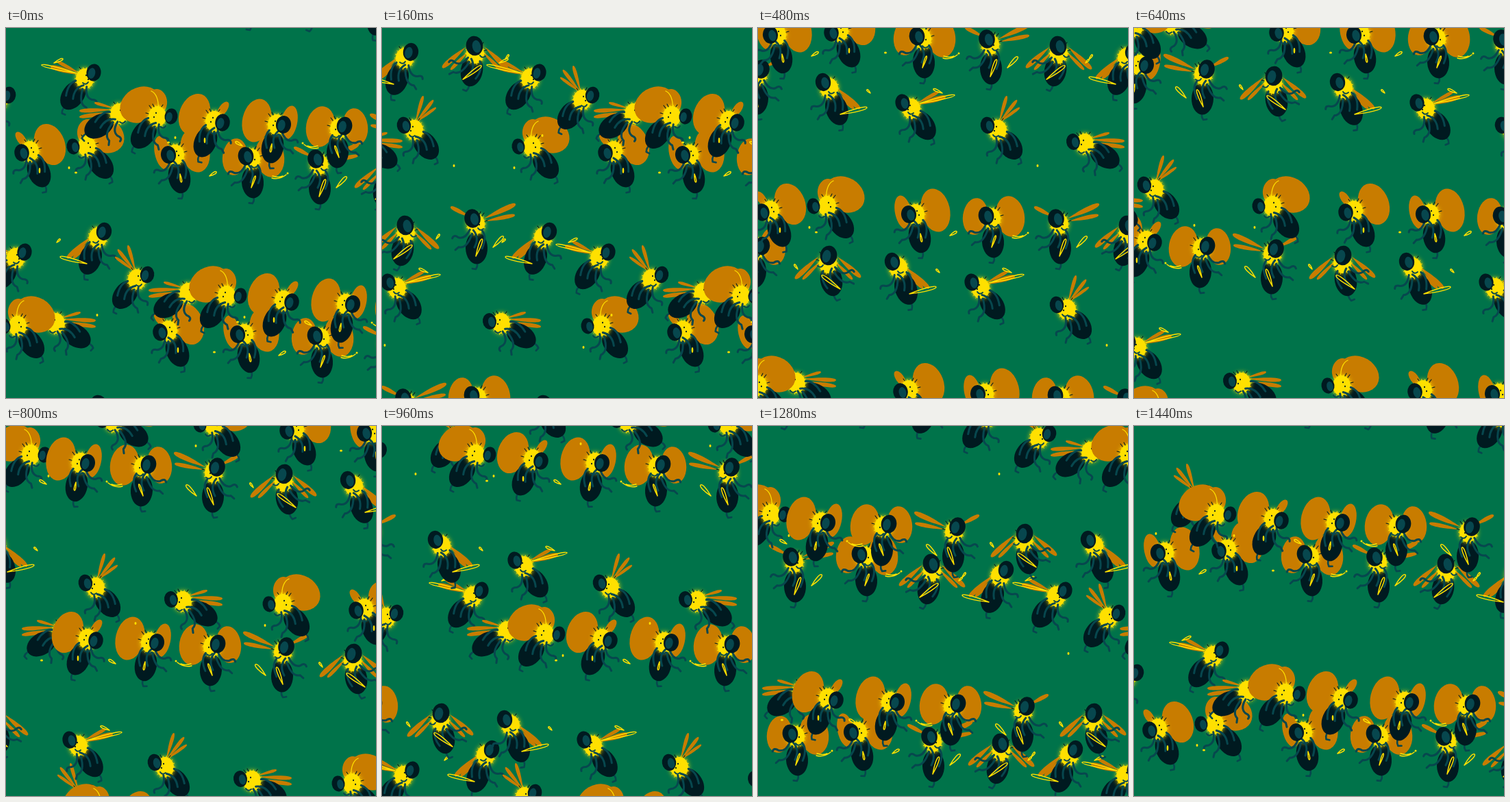
Recreate the animation shown at these times as an HTML page with a canvas. Size 540 by 540 pixels, loop 1.52 s.

```html
<!DOCTYPE html>
<html lang="en">
<head>
<meta charset="utf-8">
<title>Bees</title>
<style>
html, body { margin: 0; height: 100%; overflow: hidden; background: #00734a; }
canvas { display: block; width: 100vw; height: 100vh; }
</style>
</head>
<body>
<canvas id="stage" width="540" height="540"></canvas>
<script>
const ctx = document.getElementById('stage').getContext('2d');
const GREEN = '#00734a', ORANGE = '#c87c00', YELLOW = '#ffe000', DARK = '#001a20', TEAL = '#07474e';
const STEP = 80, FRAMES = 19, COL = 101, ROW = 262, HALF = 10;

// Half a turn of the climbing path; the other half is its mirror image.
const pathX = [41, 59, 69, 79, 77, 76, 74, 55, 30, 4];
const pathY = [173, 180, 185, 191, 199, 212, 219, 249, 280, 300];

// Head and abdomen relative to the thorax.
const heads = [[-20, 0], [-12, 2], [-10, 0], [-8, -4], [-5, -8], [-1, -11], [9, -9], [13, -9], [15, -7], [17, -3]];
const bodies = [[20, 26], [13, 30], [6, 33], [2, 34], [1, 35], [-5, 25], [-11, 31], [-17, 24], [-17, 22], [-29, 18]];

function oval(x, y, rx, ry, deg, color = ORANGE) {
  ctx.fillStyle = color;
  ctx.beginPath();
  ctx.ellipse(x, y, rx, ry, deg * Math.PI / 180, 0, 7);
  ctx.fill();
}

// Narrow wing or leaf from root to tip.
function blade(x1, y1, x2, y2, w, outline) {
  const dx = x2 - x1, dy = y2 - y1, len = Math.hypot(dx, dy);
  const nx = -dy / len * w, ny = dx / len * w;
  ctx.beginPath();
  ctx.moveTo(x1, y1);
  ctx.bezierCurveTo(x1 + dx * .55 + nx, y1 + dy * .55 + ny, x2 + nx, y2 + ny, x2, y2);
  ctx.bezierCurveTo(x2 - nx, y2 - ny, x1 + dx * .55 - nx, y1 + dy * .55 - ny, x1, y1);
  if (outline) {
    ctx.strokeStyle = YELLOW;
    ctx.lineWidth = 1.5;
    ctx.stroke();
  } else {
    ctx.fillStyle = ORANGE;
    ctx.fill();
  }
}

function line(d, color, width) {
  ctx.strokeStyle = color;
  ctx.lineWidth = width;
  ctx.stroke(new Path2D(d));
}

const wings = [
  () => {
    oval(0, -22, 14, 18, 10);
    oval(25, -17, 31, 25, 30);
    line('M-1 -12C-2 -24 2 -34 9 -37', YELLOW, 1.3);
  },
  () => { oval(-13, -18, 6, 12, -35); oval(29, -10, 22, 31, -20); },
  () => { oval(-18, -3, 12, 25, -12); oval(29, -6, 21, 32, -13); },
  () => { oval(-24, -3, 18, 27, 8); oval(27, -3, 21, 30, -10); },
  () => { blade(12, -8, 58, -29, 5); blade(13, -4, 57, -13, 4); blade(-8, -10, -37, -25, 4); },
  () => {
    blade(14, -9, 48, 23, 5); blade(10, -3, 37, 24, 3.5);
    blade(-14, -9, -48, 21, 5); blade(-10, -3, -36, 24, 3.5);
  },
  () => { blade(-9, -2, -45, 30, 5); blade(-8, 3, -36, 30, 4); },
  () => { blade(-8, -6, -50, -18, 5); blade(-8, -8, -40, -25, 3.5); },
  () => { blade(-3, -12, -28, -44, 3.5); blade(-2, -12, -13, -50, 3.5); blade(0, -10, -32, -33, 3); },
  () => { blade(-10, -6, -58, -4, 4); blade(-10, -2, -58, 5, 4); blade(-8, -8, -36, -16, 3); }
];

const marks = [
  () => oval(-26, 31, 1.5, 2, 0, YELLOW),
  () => { oval(67, 31, 2, 1.5, 0, YELLOW); oval(14, 28, 1.3, 4, 0, YELLOW); },
  () => { blade(50, 31, 60, 25, 2, 1); blade(7, 28, 9, 40, 1.5, 1); },
  () => {
    line('M30 28Q41 31 51 23M31 25Q40 28 46 25', YELLOW, 1.5);
    blade(0, 42, 6, 25, 1.5, 1);
    oval(53, 21, 1.5, 1.5, 0, YELLOW);
  },
  () => { blade(0, 47, 9, 22, 2.5, 1); blade(25, 34, 40, 18, 3, 1); },
  () => { blade(-18, 38, 9, 18, 3, 1); blade(44, 9, 49, 2, 1.5, 1); },
  () => { blade(-16, 38, -55, 28, 3, 1); blade(-60, 7, -55, 2, 1.5, 1); },
  () => { blade(-12, -8, -63, -20, 2.5, 1); blade(-45, -23, -32, -29, 2, 1); },
  () => oval(-58, 52, 1.5, 2, 0, YELLOW),
  () => {}
];

function abdomen([x, y], face) {
  ctx.save();
  ctx.rotate(Math.atan2(-x, y));
  const d = Math.hypot(x, y);
  ctx.scale(face, 1);
  line(`M2 ${d}C8 ${d + 14} -6 ${d + 20} 2 ${d + 31}l5 -1`, TEAL, 2.6);
  oval(0, d, 16, 23.5, 0, DARK);
  ctx.restore();
}

function legs([x, y], face) {
  ctx.save();
  ctx.rotate(Math.atan2(-x, y));
  ctx.scale(face, 1);
  line('M4 9Q-5 20 3 34M9 8Q16 22 26 19Q33 14 35 20M6 14Q14 36 26 33l5 4M-9 10Q-16 20 -8 36', TEAL, 3);
  ctx.restore();
}

function thorax() {
  ctx.shadowColor = YELLOW;
  ctx.shadowBlur = 7;
  oval(0, 0, 13, 15, 0, YELLOW);
  ctx.shadowBlur = 0;
  for (let a = 0; a < 6.2; a += .35) {
    const c = Math.cos(a), s = Math.sin(a);
    line(`M${c * 12} ${s * 14}L${c * 14.5} ${s * 16.5}`, YELLOW, 1);
  }
  line('M5 -14l2 -4M9 -12l3 -4M-6 -14l-2 -3M13 -4l4 -1', DARK, 1.1);
  oval(2, -5, 1, 1.2, 0, DARK);
  oval(5, 1, 1, 1.2, 0, DARK);
}

// The head looks narrower from the side.
function head([x, y]) {
  const side = Math.sign(x), r = 12.5 - Math.abs(x) * .15;
  oval(x, y, r, r + 2, side * 8, DARK);
  oval(x - side * 3, y + 1, r * .5, r * .75, side * 12, TEAL);
  line(`M${x - side * 8} ${y + 14}q${-side * 3} 5 ${-side * 8} 1`, TEAL, 2);
}

function drawBee({ x, y, pose, flip }) {
  const face = Math.sign(heads[pose][0]);
  ctx.save();
  ctx.translate(x, y);
  if (flip) ctx.scale(-1, 1);
  wings[pose]();
  abdomen(bodies[pose], face);
  thorax();
  legs(bodies[pose], face);
  head(heads[pose]);
  marks[pose]();
  ctx.restore();
}

// Phase 4 starts a half turn; each half turn drops by half a row.
function beeAt(col, row, phase, dx, dy) {
  const turn = Math.floor((phase - 4) / HALF);
  const pose = phase - 4 - turn * HALF;
  const flip = turn % 2 !== 0;
  return {
    phase, pose, flip,
    x: col * COL + dx - 24 + (flip ? -pathX[pose] : pathX[pose]),
    y: (row + turn / 2) * ROW + dy + pathY[pose]
  };
}

function swarm(step) {
  const bees = [];
  for (let row = -3; row <= 5; row++) {
    for (let col = 0; col <= 7; col++) {
      const lag = (col < 2 ? 1 - col : col) - row - step;
      bees.push(beeAt(col, row, 4 + lag, 0, 0), beeAt(col, row, 11 + lag, -17, -175));
    }
  }
  return bees
    .filter(b => b.x > -90 && b.x < 630 && b.y > -90 && b.y < 620)
    .sort((a, b) => a.phase - b.phase);
}

let shown = -1;
function tick() {
  const step = Math.floor(performance.now() / STEP) % FRAMES;
  if (step !== shown) {
    shown = step;
    ctx.fillStyle = GREEN;
    ctx.fillRect(0, 0, 540, 540);
    swarm(step).forEach(drawBee);
  }
  requestAnimationFrame(tick);
}

ctx.lineCap = ctx.lineJoin = 'round';
tick();
</script>
</body>
</html>
```
